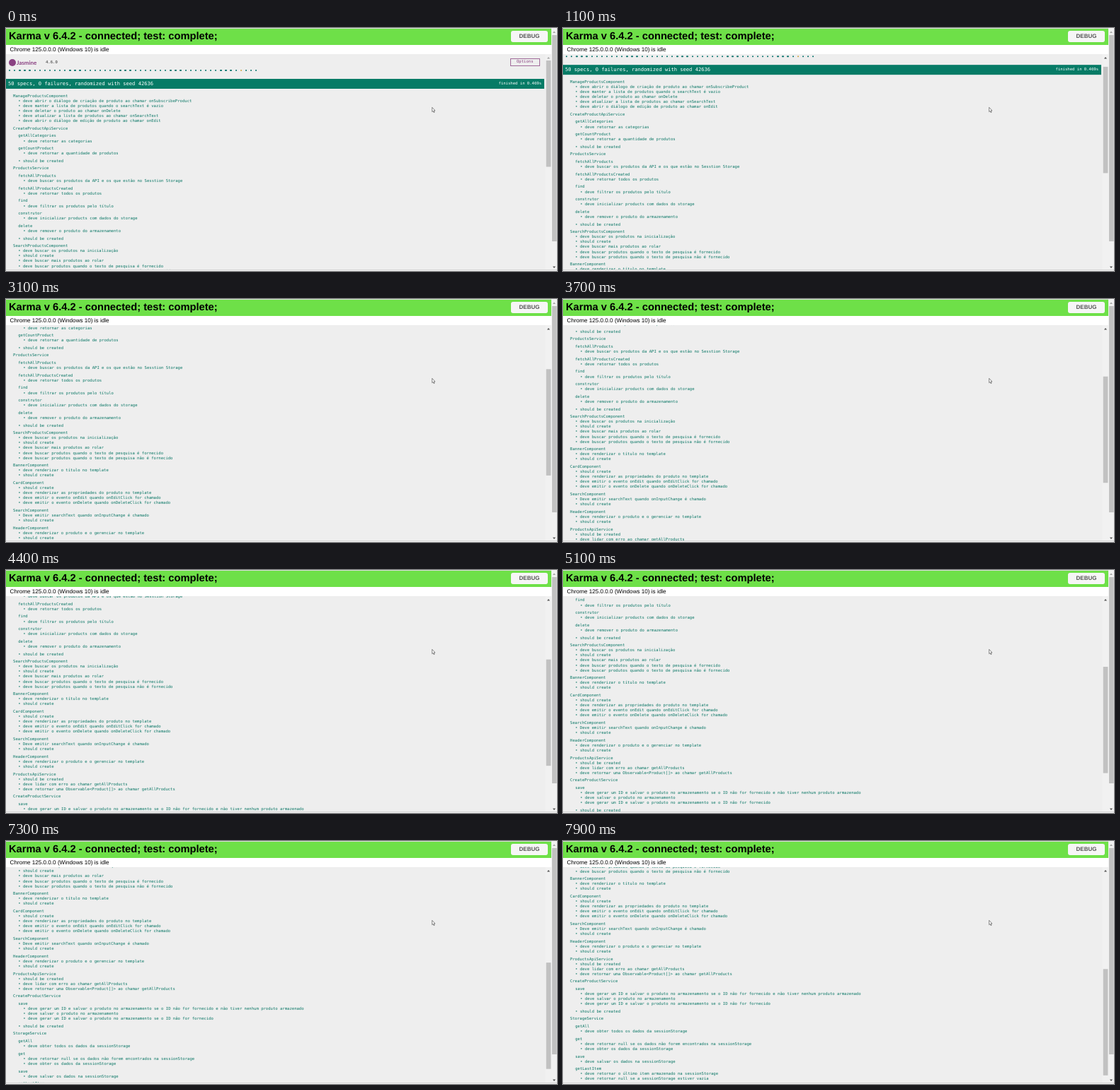
These frames come from a looping animation (778x344 px, 8000 ms). An HTML page:

```html
<!DOCTYPE html>
<html lang="pt">
<head>
<meta charset="utf-8">
<title>Karma</title>
<style>
  html, body { margin: 0; width: 100%; height: 100%; overflow: hidden; background: #fff; }
  body { position: relative; text-rendering: geometricPrecision; font-family: "Liberation Sans", Arial, sans-serif; }
  div, svg { position: absolute; box-sizing: border-box; white-space: pre; }
  #header { width: 770px; height: 24px; background: #6ee048; border-top: 1px solid #dcdcdc; }
  #title { left: 4px; top: 1px; font-weight: bold; font-size: 14.7px; line-height: 21.5px; }
  #debug { left: 713px; top: 2.5px; width: 52px; height: 16px; border-radius: 3px; background: #f6f6f6;
    color: #555; font-weight: bold; font-size: 8px; line-height: 16px; text-align: center; }
  #browser { left: 5.6px; top: 23.8px; font-size: 8.15px; line-height: 14.5px; }
  #frame { top: 37px; width: 770px; height: 305px; overflow: hidden; background: #eee; }
  #page { top: -37px; width: 762px; font: 5.58px/7.08px "DejaVu Sans Mono", monospace; color: #0c7867; }
  #logo { left: 4px; top: 44px; width: 10px; height: 10px; border-radius: 50%; background: #8a4182; }
  #name { left: 15px; top: 44px; font: bold 8px/10px Lato, sans-serif; color: #8a4182; }
  #version { left: 56px; top: 46px; color: #333; }
  #options { left: 712px; top: 43px; width: 41.5px; height: 11px; border: 1px solid #a06a99;
    line-height: 9px; text-align: center; color: #8a4182; }
  .dot { top: 59px; width: 2.4px; height: 2.4px; border-radius: 50%; background: #007069; }
  .empty { background: #cfa23a; }
  #bar { top: 72px; width: 760px; height: 13.5px; background: #067b66; color: #fff; line-height: 13px; }
  #summary { left: 3px; top: 0; font-size: 7.1px; }
  #duration { right: 4px; top: 1px; }
  #bottom { top: 342px; width: 778px; height: 2px; background: #f6f6f6; border-top: 1px solid #d2d2d2; }
</style>
</head>
<body>
<div id="header">
  <div id="title">Karma v 6.4.2 - connected; test: complete;</div>
  <div id="debug">DEBUG</div>
</div>
<div id="browser">Chrome 125.0.0.0 (Windows 10) is idle</div>
<div id="frame">
  <div id="page">
    <div id="logo"></div><div id="name">Jasmine</div><div id="version">4.6.0</div>
    <div id="options">Options</div>
    <div id="bar">
      <div id="summary">50 specs, 0 failures, randomized with seed 42636</div>
      <div id="duration">finished in 0.469s</div>
    </div>
  </div>
</div>
<svg width="778" height="344" style="left:0;top:0">
  <path d="M761.5 37h8.5V0h8v342h-16.5z" fill="#f1f1f1"/>
  <g fill="#c1c1c1">
    <rect id="thumb" x="762.7" y="46" width="6.7" height="150.5"/>
    <rect x="771" y="10" width="6.6" height="292"/>
  </g>
  <path id="up" d="M764 43.5l2-2.5 2 2.5z"/>
  <path d="M772 7l2-2.5 2 2.5z" fill="#a3a3a3"/>
  <path d="M772 337.5l2 2.5 2-2.5z" fill="#505050"/>
  <path d="M601.7 112.3v6.3l1.4-1.2 1 2.3 1-.5-1-2.2h1.9z" fill="#fff" stroke="#555" stroke-width=".7"/>
</svg>
<div id="bottom"></div>
<script>
// Leading spaces give the level, "-" marks a spec.
const results = `ManageProductsComponent
 -deve abrir o diálogo de criação de produto ao chamar onSubscribeProduct
 -deve manter a lista de produtos quando o searchText é vazio
 -deve deletar o produto ao chamar onDelete
 -deve atualizar a lista de produtos ao chamar onSearchText
 -deve abrir o diálogo de edição de produto ao chamar onEdit
CreateProductApiService
 getAllCategories
  -deve retornar as categorias
 getCountProduct
  -deve retornar a quantidade de produtos
 -should be created
ProductsService
 fetchAllProducts
  -deve buscar os produtos da API e os que estão no Sesstion Storage
 fetchAllProductsCreated
  -deve retornar todos os produtos
 find
  -deve filtrar os produtos pelo título
 construtor
  -deve inicializar products com dados do storage
 delete
  -deve remover o produto do armazenamento
 -should be created
SearchProductsComponent
 -deve buscar os produtos na inicialização
 -should create
 -deve buscar mais produtos ao rolar
 -deve buscar produtos quando o texto de pesquisa é fornecido
 -deve buscar produtos quando o texto de pesquisa não é fornecido
BannerComponent
 -deve renderizar o título no template
 -should create
CardComponent
 -should create
 -deve renderizar as propriedades do produto no template
 -deve emitir o evento onEdit quando onEditClick for chamado
 -deve emitir o evento onDelete quando onDeleteClick for chamado
SearchComponent
 -Deve emitir searchText quando onInputChange é chamado
 -should create
HeaderComponent
 -deve renderizar o produto e o gerenciar no template
 -should create
ProductsApiService
 -should be created
 -deve lidar com erro ao chamar getAllProducts
 -deve retornar uma Observable<Product[]> ao chamar getAllProducts
CreateProductService
 save
  -deve gerar um ID e salvar o produto no armazenamento se o ID não for fornecido e não tiver nenhum produto armazenado
  -deve salvar o produto no armazenamento
  -deve gerar um ID e salvar o produto no armazenamento se o ID não for fornecido
 -should be created
StorageService
 getAll
  -deve obter todos os dados da sessionStorage
 get
  -deve retornar null se os dados não forem encontrados na sessionStorage
  -deve obter os dados da sessionStorage
 save
  -deve salvar os dados na sessionStorage
 getLastItem
  -deve retornar o último item armazenado na sessionStorage
  -deve retornar null se a sessionStorage estiver vazia`;

const LINE = 7.08, NOTCH = 20.23, LOOP = 8000;
const wheelTimes = [1000, 1400, 1800, 2200, 2600, 3100, 3500, 4000, 4400, 4900, 5400, 6000, 6400, 7300, 7900];
const [page, thumb, up] = ['page', 'thumb', 'up'].map(id => document.getElementById(id));

function addDiv(left, top, className = '', text = '') {
  const div = document.createElement('div');
  div.className = className;
  div.textContent = text;
  div.style.left = left + 'px';
  if (top !== null) div.style.top = top + 'px';
  page.append(div);
}

for (let i = 0; i < 50; i++) addDiv(4 + i * 7.1, null, i === 46 ? 'dot empty' : 'dot');

let rowTop = 93.8, lastLevel = 0;
results.split('\n').forEach((row, i) => {
  const level = row.search(/\S/), label = row.trim(), isSpec = label[0] === '-';
  if (i) rowTop += isSpec && level >= lastLevel ? LINE : LINE * 1.5;
  addDiv(10.1 + level * 7.1, rowTop, '', label.replace(/^-/, '• '));
  lastLevel = level;
});

// Smooth scrolling, refreshed ten times a second: each notch settles within three steps.
function scrollAt(time) {
  const now = Math.floor(time / 100) * 100;
  return wheelTimes.reduce((sum, start) =>
    now < start ? sum : sum + NOTCH * ([0.86, 0.98][(now - start) / 100] ?? 1), 0);
}

function draw() {
  const y = scrollAt(performance.now() % LOOP);
  page.style.transform = `translateY(${-y}px)`;
  thumb.setAttribute('transform', `translate(0 ${y * 0.45})`);
  up.setAttribute('fill', y ? '#505050' : '#a3a3a3');
  requestAnimationFrame(draw);
}
draw();
</script>
</body>
</html>
```
